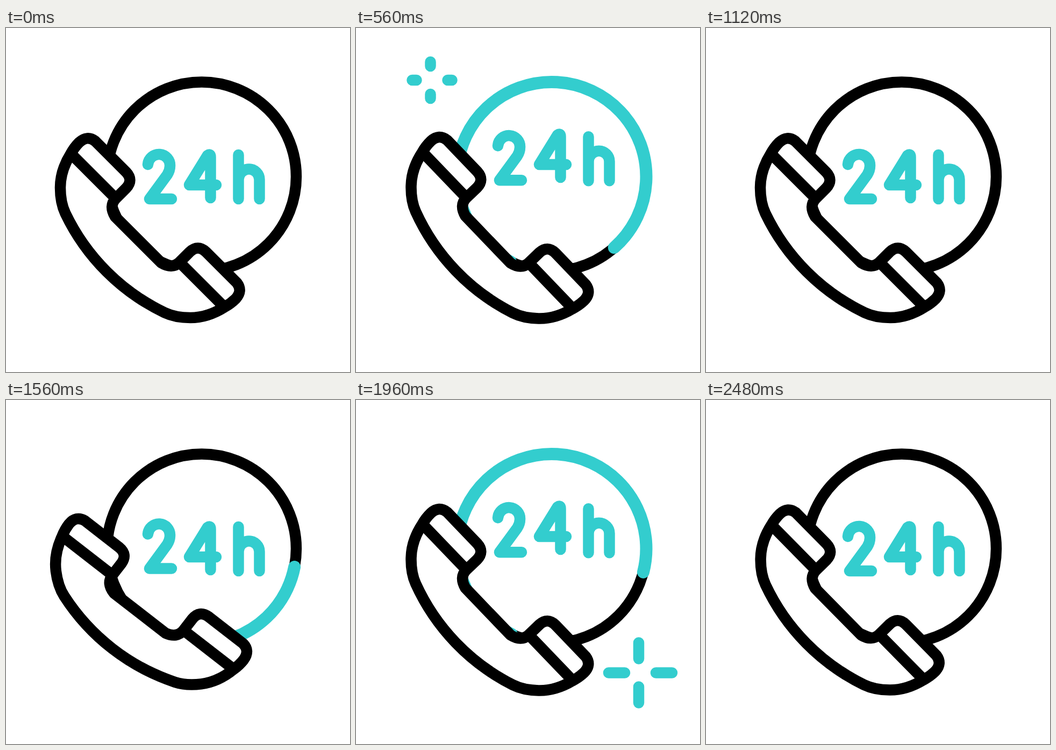
An HTML page for the animation above (3000 ms loop, 640 by 640 pixels).

```html
<!DOCTYPE html>
<html lang="en">
<head>
<meta charset="utf-8">
<title>24h phone support</title>
<style>
  html, body { margin: 0; width: 100%; height: 100%; overflow: hidden; background: #fff; }
  svg { display: block; width: 100%; height: 100%; }
  path, circle { fill: none; stroke-width: 20.5; stroke-linejoin: round; }
  .ink { stroke: #000; }
  .teal { stroke: #33cdce; stroke-linecap: round; }
  #arc { stroke-width: 23; }
  #body { fill: #fff; }
</style>
</head>
<body>
<svg viewBox="0 0 640 640" role="img" aria-label="24h">
  <circle class="ink" cx="364" cy="276.5" r="176"/>
  <circle id="arc" class="teal" r="176" pathLength="360" transform="translate(364 276.5) rotate(115) scale(1 -1)"/>
  <g class="teal">
    <path class="glyph" d="M264 254A20.5 20.5 0 0 1 305 257Q305 265 300 273L267 318H308"/>
    <path class="glyph" d="M391 292H341L375 237Q380.5 233 380.5 240V316"/>
    <path class="glyph" d="M432.5 236V318M432.5 282A19.5 19.5 0 0 1 471.5 282V318"/>
  </g>
  <g id="phone" class="ink">
    <path id="body" d="M120.5 234Q127 222 136 213Q151 199 166 210.5L223.5 268Q237.5 283 223.5 298L204 317.5Q191 331 203 351L289 437Q309 449 322.5 436L342 416.5Q357 402.500 372 416.500L429.500 474Q441 489 427 504Q418 513 406 519.5Q375 539 343 539Q315 539 295 529.5A393 393 0 0 1 110.500 345Q101 325 101 297Q101 265 120.500 234Z"/>
    <path d="M123 236L203 316M324 437L404 517"/>
  </g>
  <path class="spark teal" transform="translate(138.5 97)"/>
  <path class="spark teal" transform="translate(526 507.5)"/>
</svg>
<script>
const $ = id => document.getElementById(id);
const glyphs = document.querySelectorAll('.glyph');
const sparks = document.querySelectorAll('.spark');
const LOOP = 3000, STEP = 40, SECOND = 1400;

// progress 0..1 of a move that starts at a and lasts d
const part = (t, a, d) => Math.min(1, Math.max(0, (t - a) / d));
const smooth = u => u * u * (3 - 2 * u);
const ease = (t, a, d) => smooth(part(t, a, d));
const soft = u => 0.2 * u + 0.8 * smooth(u);

// [time, degrees]
const swing = [[0, 0], [165, -7.2], [410, 5.2], [480, 5.2], [690, -7.2], [900, 5.2], [1120, 0]];
// [rise start, fall start, height]
const hops = [[80, 545, 35], [170, 618, 38], [240, 692, 35]];
// [grow start, fade start]
const bursts = [[465, 800], [1640, 1980]];

function angle(p) {
  let a = 0;
  for (let i = 1; i < swing.length; i++) {
    const [t0, a0] = swing[i - 1], [t1, a1] = swing[i];
    a += (a1 - a0) * ease(p, t0, t1 - t0);
  }
  return a;
}

function drawArc(p, shift) {
  const head = 360 * soft(part(p, shift, 560));
  const tail = 360 * soft(part(p, shift + 431, 480));
  const on = p >= STEP && head > tail;
  $('arc').style.display = on ? '' : 'none';
  $('arc').setAttribute('stroke-dasharray', `${head - tail} 400`);
  $('arc').setAttribute('stroke-dashoffset', -tail);
}

function drawSpark(el, t, [grow, fade]) {
  const a = 30 * ease(t, fade, 280), b = 30 * ease(t, grow, 280);
  el.setAttribute('d', b > a
    ? `M0 ${-26 - a}V${-26 - b}M0 ${26 + a}V${26 + b}M${-26 - a} 0H${-26 - b}M${32 + a} 0H${32 + b}`
    : '');
}

function draw(t) {
  const again = t >= SECOND, p = again ? t - SECOND : t;
  $('phone').setAttribute('transform', `rotate(${angle(p)} 268 372)`);
  drawArc(p, again ? -33 : 5);
  glyphs.forEach((g, i) => {
    const [up, down, h] = hops[i];
    g.setAttribute('transform', `translate(0 ${h * (ease(p, down, 360) - ease(p, up, 360))})`);
  });
  sparks.forEach((s, i) => drawSpark(s, t, bursts[i]));
}

const start = performance.now();
function tick() {
  const t = (performance.now() - start) % LOOP;
  draw(Math.floor(t / STEP) * STEP);
  requestAnimationFrame(tick);
}
tick();
</script>
</body>
</html>
```
